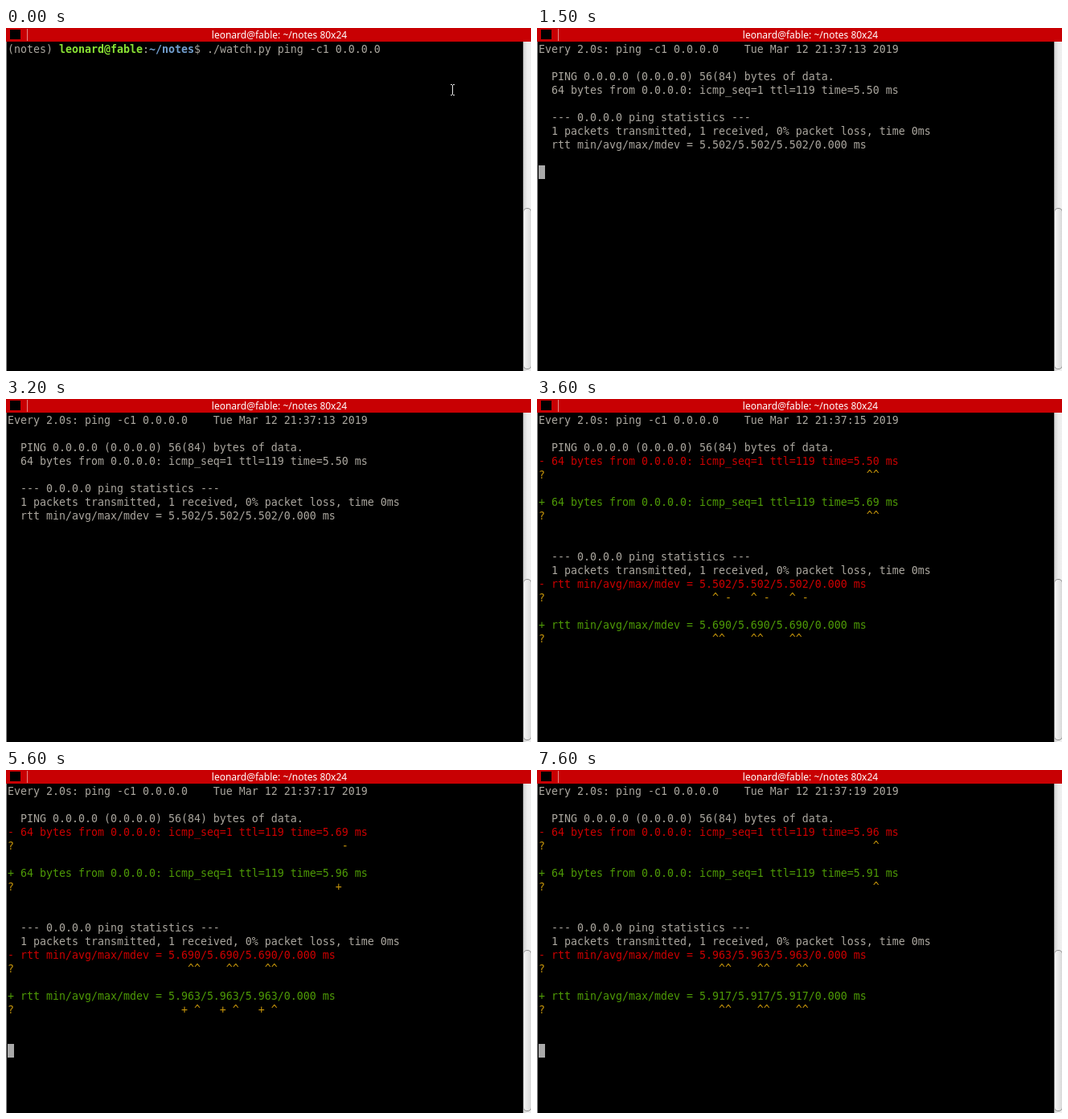
These frames come from a looping animation (653 by 427 pixels, 8000 ms). An HTML page:

```html
<!DOCTYPE html>
<html lang="en">
<head>
<meta charset="utf-8">
<title>Terminal</title>
<style>
  html, body { margin: 0; width: 100%; height: 100%; overflow: hidden; background: #000; }
  body { position: relative; }
  body > * { position: absolute; }
  #title { left: 0; top: 0; width: 653px; height: 17px; background: #c80003; }
  #title span {
    position: absolute; left: 27px; right: 0; top: 0; text-align: center; white-space: pre;
    font: 12px/17px "Noto Sans", sans-serif; color: #fff;
  }
  #title i { position: absolute; left: 5px; top: 2px; width: 13px; height: 12px; background: #000; }
  #title b { position: absolute; left: 26px; top: 1px; width: 1px; height: 15px; background: #e58a8a; }
  #edge { left: 0; top: 17px; width: 1px; height: 410px; background: #8c8c8c; }
  #track {
    left: 643px; top: 17px; width: 9px; height: 410px; border-left: 1px solid #a5a5a5;
    background: linear-gradient(90deg, #d6d6d6, #ececec 50%, #f0f0f0);
  }
  #thumb {
    left: 643px; top: 224px; width: 9px; height: 199px; border: 1px solid #8f8f8f;
    border-radius: 5px; background: linear-gradient(90deg, #f4f4f4, #dadada);
  }
  #screen {
    left: 2px; top: 18px; margin: 0; color: #aaa69e;
    font: 13.29px/17px "DejaVu Sans Mono", monospace;
  }
  #cursor { width: 8px; height: 17px; background: #aaa; }
  #pointer { left: 552px; top: 70px; }
  .user { color: #8ae234; font-weight: bold; }
  .path { color: #729fcf; font-weight: bold; }
  .old { color: #cc0000; }
  .new { color: #4e9a06; }
  .hint { color: #c4930a; }
</style>
</head>
<body>
<div id="title"><i></i><b></b><span></span></div>
<div id="edge"></div>
<div id="track"></div>
<div id="thumb"></div>
<div id="cursor"></div>
<pre id="screen"></pre>
<svg id="pointer" width="7" height="14" fill="none" stroke="#e8e8e8">
  <path d="M1 .5h2M4 .5h2M3.5 1v12M1 13.5h2M4 13.5h2"/>
</svg>
<script>
const LOOP = 8000;
const USER = "leonard@fable", DIR = "notes", HOST = "0.0.0.0";
const BLINKS = [100, 700, 1300, 2000, 2600, 3200, 3900, 4400, 5100, 5700, 6300, 6900, 7500];

const byId = id => document.getElementById(id);
const screen = byId("screen"), cursor = byId("cursor"), pointer = byId("pointer");
const span = (type, text) => `<span class="${type}">${text}</span>`;

const prompt = `(${DIR}) ${span("user", USER)}:${span("path", "~/" + DIR)}$ ./watch.py ping -c1 ${HOST}`;
const header = sec => `Every 2.0s: ping -c1 ${HOST}    Tue Mar 12 21:37:${sec} 2019`;
const intro = `  PING ${HOST} (${HOST}) 56(84) bytes of data.`;
const reply = rtt => ` 64 bytes from ${HOST}: icmp_seq=1 ttl=119 time=${rtt.slice(0, 4)} ms`;
const summary = [`  --- ${HOST} ping statistics ---`,
  "  1 packets transmitted, 1 received, 0% packet loss, time 0ms"];
const rttLine = rtt => ` rtt min/avg/max/mdev = ${rtt}/${rtt}/${rtt}/0.000 ms`;

// Changed digits are marked below the values: one in the reply, three in the rtt line.
const replyHint = marks => span("hint", "?" + " ".repeat(48) + marks);
const rttHint = marks => span("hint", "?" + " ".repeat(24) + marks.padEnd(6).repeat(3));

const first = (sec, rtt) =>
  [header(sec), "", intro, " " + reply(rtt), "", ...summary, " " + rttLine(rtt)].join("\n");

const diff = (sec, before, after, [replyOld, replyNew, rttOld, rttNew]) => [
  header(sec), "", intro,
  span("old", "-" + reply(before)), replyHint(replyOld), "",
  span("new", "+" + reply(after)), replyHint(replyNew), "", "",
  ...summary,
  span("old", "-" + rttLine(before)), rttHint(rttOld), "",
  span("new", "+" + rttLine(after)), rttHint(rttNew)
].join("\n");

const scenes = [
  { at: 0, col: 58, row: 0, html: prompt, pointer: true },
  { at: 1400, col: 0, row: 1, html: prompt },
  { at: 1500, col: 0, row: 9, html: first(13, "5.502") },
  { at: 3600, col: 0, row: 19, html: diff(15, "5.502", "5.690", ["  ^^", "  ^^", "  ^ -", "  ^^"]) },
  { at: 5600, col: 0, row: 19, html: diff(17, "5.690", "5.963", ["   -", "  +", "   ^^", "  + ^"]) },
  { at: 7600, col: 0, row: 19, html: diff(19, "5.963", "5.917", ["   ^", "   ^", "   ^^", "   ^^"]) }
];

let shown;
function show(scene) {
  if (scene === shown) return;
  shown = scene;
  screen.innerHTML = scene.html;
  cursor.style.left = 2 + 8 * scene.col + "px";
  cursor.style.top = 18 + 17 * scene.row + "px";
  pointer.style.display = scene.pointer ? "block" : "none";
}

function draw() {
  const t = performance.now() % LOOP;
  show(scenes.findLast(scene => scene.at <= t));
  const toggles = BLINKS.filter(at => at <= t).length;
  cursor.style.visibility = toggles % 2 ? "visible" : "hidden";
  requestAnimationFrame(draw);
}

document.querySelector("#title span").textContent = `${USER}: ~/${DIR} 80x24`;
draw();
</script>
</body>
</html>
```
